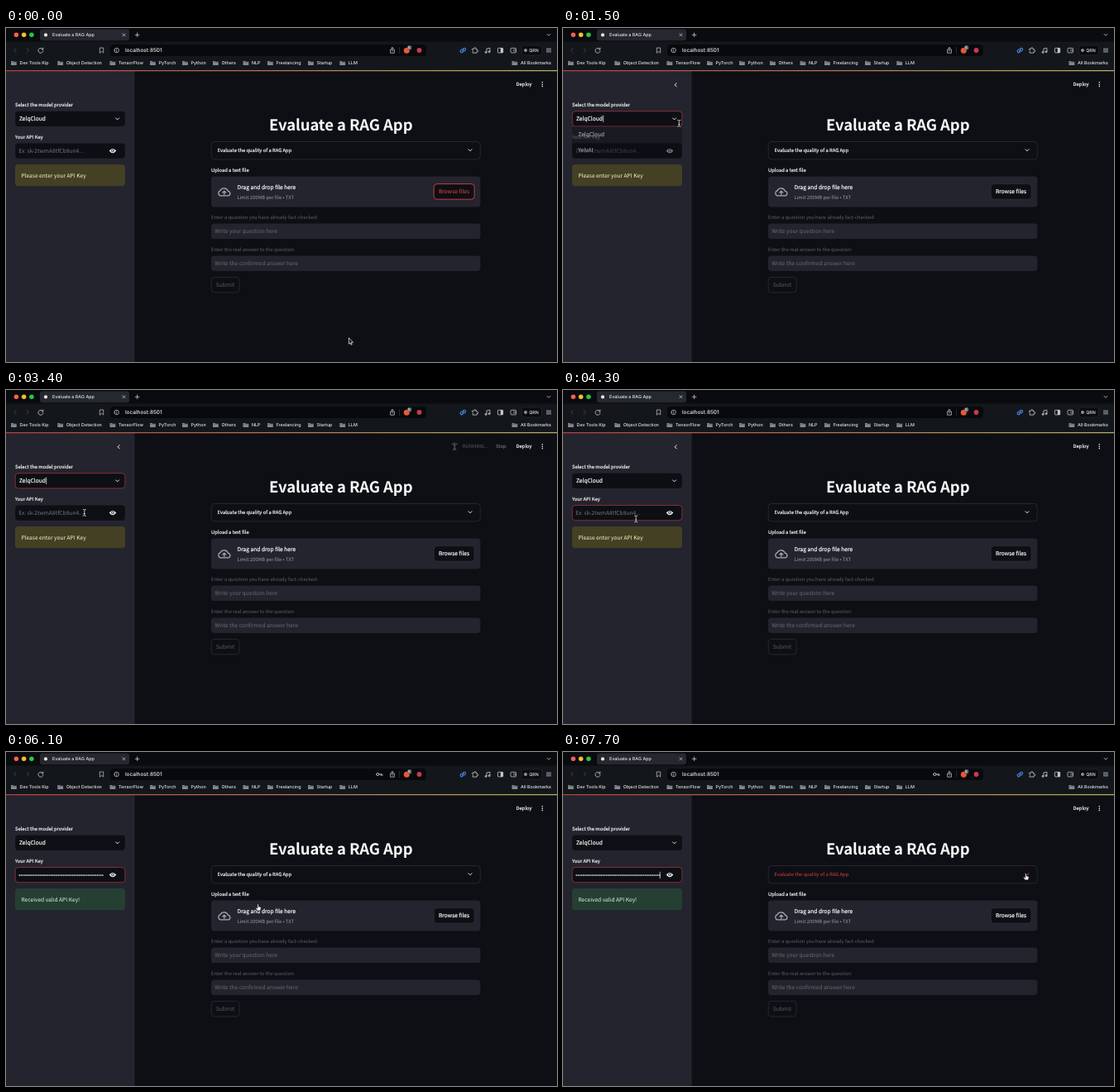
Animation, 666 px wide and 404 px high, one loop 8 s. Source, as an HTML page with a canvas:

```html
<!DOCTYPE html>
<html lang="en">
<head>
<meta charset="utf-8">
<title>Evaluate a RAG App</title>
<style>
  html, body { margin: 0; width: 100%; height: 100%; overflow: hidden; background: #0d0f14; }
  canvas { display: block; width: 666px; height: 404px; }
</style>
</head>
<body>
<canvas id="stage"></canvas>
<script>
const W = 666, H = 404, LOOP = 8000;
const canvas = document.getElementById('stage');
const ctx = canvas.getContext('2d');
const dpr = window.devicePixelRatio || 1;
canvas.width = W * dpr;
canvas.height = H * dpr;

const SANS = '"Noto Sans CJK JP", "Noto Sans CJK SC", "Noto Sans CJK", "Open Sans", sans-serif';
const UI = 'Inter, Roboto, "Liberation Sans", sans-serif';
const BODY = 6.65, SMALL = 5.83;
const BG = '#0d0f14', PANEL = '#23242d', TEXT = '#f6f6f7', RED = '#f0474a', FOCUS = '#b0383d', DIM = '#606269';
const PROVIDER = 'ZelqCloud', OTHER = 'YelvAI';

// ---------- helpers ----------
const clamp = v => Math.max(0, Math.min(1, v));
const ramp = (t, a, b) => clamp((t - a) / (b - a));
const pulse = (t, a, b, c, d) => ramp(t, a, b) * (1 - ramp(t, c, d));
const ease = p => p * p * (3 - 2 * p);
const within = (t, a, b) => t >= a && t < b;

// A hairline outline gives small bright text its slightly heavy look.
function text(str, x, y, size = BODY, color = TEXT, o = {}) {
  ctx.font = `${o.weight || 400} ${size}px ${o.font || SANS}`;
  ctx.textAlign = o.align || 'left';
  ctx.letterSpacing = o.spacing || '0px';
  ctx.textRendering = 'geometricPrecision';
  ctx.fillStyle = ctx.strokeStyle = color;
  ctx.fillText(str, x, y + size * 0.36);
  if (color === TEXT) {
    ctx.lineWidth = 0.2;
    ctx.lineJoin = 'round';
    ctx.strokeText(str, x, y + size * 0.36);
  }
  return ctx.measureText(str).width;
}
const ui = (str, x, y, size = 5.38, color = '#e6e7ea') =>
  text(str, x, y, size, color, { font: UI, weight: 500 });

function box(x, y, w, h, r, fill, stroke, lw = 0.7) {
  ctx.beginPath();
  ctx.roundRect(x, y, w, h, r);
  if (fill) { ctx.fillStyle = fill; ctx.fill(); }
  if (stroke) { ctx.strokeStyle = stroke; ctx.lineWidth = lw; ctx.stroke(); }
}
function dot(x, y, r, color) {
  ctx.beginPath();
  ctx.arc(x, y, r, 0, Math.PI * 2);
  ctx.fillStyle = color;
  ctx.fill();
}
// Path given relative to (x, y).
function icon(d, x, y, color, lw = 0.8, fill) {
  const p = new Path2D(d);
  ctx.save();
  ctx.translate(x, y);
  ctx.lineCap = ctx.lineJoin = 'round';
  if (fill) { ctx.fillStyle = fill; ctx.fill(p); }
  if (lw) { ctx.strokeStyle = color; ctx.lineWidth = lw; ctx.stroke(p); }
  ctx.restore();
}
function faded(alpha, draw) {
  if (alpha <= 0) return;
  ctx.save();
  ctx.globalAlpha = alpha;
  draw();
  ctx.restore();
}
const chevron = (x, y, color = TEXT) => icon('M-2 -1L0 1L2 -1', x, y, color, 0.95);
const caret = (x, y) => { ctx.fillStyle = TEXT; ctx.fillRect(x, y - 4.2, 0.7, 8.4); };

// ---------- browser frame ----------
const BOOKMARKS = [
  [6, 'Dev Tools Kip'], [62.3, 'Object Detection'], [125.5, 'TensorFlow'], [174, 'PyTorch'],
  [213, 'Python'], [250, 'Others'], [286.5, 'NLP'], [316, 'Freelancing'], [365, 'Startup'],
  [403.3, 'LLM'], [611.5, 'All Bookmarks']
];

function folder(x, y) {
  icon('M0 -2.4H2.5L3.3 -1.6H6.8V2.6H0Z', x, y, '', 0, '#85878e');
  ctx.fillStyle = '#55575e';
  ctx.fillRect(x, y - 1, 6.8, 0.5);
}

function browser(t) {
  const C = '#c9cad0', G = '#4c4e56';
  ctx.fillStyle = '#0a0b0f';
  ctx.fillRect(0, 0, W, 17);
  ctx.fillStyle = '#13171b';
  ctx.fillRect(0, 16.5, W, 35.5);

  ['#ff5f57', '#febc2e', '#28c840'].forEach((c, i) => dot(12.4 + i * 9.25, 8.3, 2.75, c));
  box(41, 1.5, 108, 13.7, 3, '#26282f');
  dot(48, 8.4, 2.1, '#e4e4e8');
  ui('Evaluate a RAG App', 56, 8.2);
  icon('M-1.5 -1.5L1.5 1.5M1.5 -1.5L-1.5 1.5', 142.5, 8.3, C);
  icon('M-2.3 0H2.3M0 -2.3V2.3', 158.6, 8.3, C);
  icon('M-2 -1L0 1L2 -1', 656, 8.3, C);

  icon('M1.2 -2.5L-1.3 0L1.2 2.5', 11, 27, G);
  icon('M-1.2 -2.5L1.3 0L-1.2 2.5', 26.3, 27, G);
  icon('M2.5 -1.4A3 3 0 1 0 3 .6M2.9 -3V-1.1H1', 42, 27, C);
  icon('M-2 -3H2V3L0 1.4L-2 3Z', 115.7, 27, C, 0.7);

  box(126, 20, 382, 14, 4, '#08090c');
  icon('M-2.8 0A2.8 2.8 0 1 0 2.8 0A2.8 2.8 0 1 0 -2.8 0M0 -.1V1.4M0 -1.4V-1.3', 133.6, 27, C, 0.75);
  ui('localhost:8501', 144, 26.8, 6.45, '#eeeef1');
  if (t >= 4600) {
    icon('M-3.6 0A1.6 1.6 0 1 0 -.4 0A1.6 1.6 0 1 0 -3.6 0M-.4 0H3.6V1.4M2 0V1.3', 451.3, 27, C, 0.9);
  }
  icon('M-1 -1H-2.4V3.2H2.4V-1H1M0 1V-3.4M-1.4 -2.1L0 -3.5L1.4 -2.1', 467, 27, C, 0.75);
  ctx.fillStyle = '#3a3c44';
  ctx.fillRect(475, 23, 0.6, 8);
  dot(484.3, 27.2, 3.5, '#ee5630');
  box(485.3, 21.2, 4.8, 5, 1.2, '#686b78');
  ui('5', 486.1, 23.8, 4, '#fff');
  dot(499.5, 27, 2.9, '#c93a52');

  icon('M-.6 .9L1 -.8M-.4 -1.2L1 -2.6A1.6 1.6 0 0 1 3.1 -.4L1.6 1M.5 1.4L-.8 2.6A1.6 1.6 0 0 1 -3 .5L-1.6 -.9', 552.3, 27, '#4a86ee', 1.1);
  icon('M-2.8 -1.8H-.9A1 1 0 1 1 .9 -1.8H2.3V0A1 1 0 1 1 2.3 1.5V3.1H-2.8V1.6A1 1 0 0 0 -2.8 -.2Z', 566.8, 27, C, 0.8);
  icon('M-1.3 2V-2.4L2.7 -3.2V1.2M-3 2A.9 .8 0 1 0 -1.3 2A.9 .8 0 1 0 -3 2M1 1.3A.9 .8 0 1 0 2.7 1.3A.9 .8 0 1 0 1 1.3', 582.2, 27.4, C, 0.8);
  box(594.4, 24.3, 6.3, 5.6, 0.8, null, C, 0.8);
  ctx.fillStyle = C;
  ctx.fillRect(597.8, 24.3, 2.9, 5.6);
  box(610, 24.3, 6.5, 5.6, 1, null, C, 0.75);
  box(613.6, 26, 2.9, 2.1, 0.5, null, C, 0.6);
  box(623.5, 21, 24, 12, 3, '#0b0c10', '#2b2d34', 0.6);
  dot(628, 27, 2, '#8e9097');
  ui('QRN', 632.3, 26.8, 5.3);
  icon('M-2.6 -1.9H2.6M-2.6 0H2.6M-2.6 1.9H2.6', 656, 27, C, 0.75);

  BOOKMARKS.forEach(([x, name]) => { folder(x, 42.3); ui(name, x + 10.5, 42.2); });
}

// ---------- sidebar ----------
function eye(x, y) {
  icon('M-4.3 0Q0 -5.4 4.3 0Q0 5.4 -4.3 0Z', x, y, '', 0, TEXT);
  dot(x, y, 1.75, '#0d0f14');
  dot(x, y, 1, TEXT);
}

function options(alpha) {
  faded(alpha, () => {
    box(11, 119.5, 133, 37.5, 3.5, BG);
    box(11, 119.5, 133, 18.7, 3.5, '#1c1d25');
    text(PROVIDER, 18.3, 128.6);
    text(OTHER, 18.3, 147.2);
  });
}

const control = (y, focused) => box(11.2, y, 132.6, 18.2, 3.7, BG, focused ? FOCUS : null);

function sidebar(t) {
  const selectOn = within(t, 1400, 3700), keyOn = t >= 3700;
  const pasted = t >= 4600, valid = t >= 5400;
  ctx.fillStyle = PANEL;
  ctx.fillRect(0, 52, 155.5, H - 52);

  if (within(t, 900, 6000)) icon('M1 -2.1L-1.1 0L1 2.1', 136.2, 68.8, TEXT, 1);

  text('Select the model provider', 11, 93, SMALL);
  control(100.7, selectOn);
  const w = text(PROVIDER, 16, 109.9);
  if (selectOn && (t < 1900 || within(t, 2400, 2900) || t >= 3400)) caret(16.6 + w, 109.8);
  chevron(134.6, 109.9);

  text('Your API Key', 11, 131.9, SMALL);
  control(139.5, keyOn);
  if (pasted) {
    for (let x = 16.2; x < 117; x += 2.14) dot(x, 149, 0.85, TEXT);
  } else {
    text('Ex: sk-2twmA8tfCb8un4...', 15.2, 148.7, BODY, '#74767c');
  }
  if (pasted ? (t - 4600) % 1000 < 500 : within(t, 3800, 4300)) caret(pasted ? 116.8 : 14.6, 149);
  eye(129, 148.6);

  box(11, 165, 133, 26.2, 3.7, valid ? '#253f33' : '#444024');
  text(valid ? 'Received valid API Key!' : 'Please enter your API Key', 18.4, 178.3, BODY,
    valid ? '#dcfbe6' : '#fcf9c6');

  options(pulse(t, 1400, 1600, 2550, 2800));
}

// ---------- main page ----------
const LEFT = 248, WIDE = 325.4;

function field(label, hint, y) {
  text(label, LEFT, y, SMALL, DIM);
  box(LEFT, y + 7.3, WIDE, 18.5, 3.7, PANEL);
  text(hint, 252.2, y + 16.7, BODY, '#6a6c73');
}

function running(alpha) {
  faded(alpha, () => {
    const c = '#5b5d63';
    dot(542.2, 64.4, 1, c);
    icon('M-3 -3.2L-1 -1.4H1L3 -3.2M0 -1.4V1.4M0 1.4L-1.5 4.6M0 1.4L1.5 4.6', 542.2, 68.1, c, 1.1);
    text('RUNNING...', 551.8, 68.2, SMALL, c);
    text('Stop', 592, 68.2, SMALL, '#8b8d92');
  });
}

function page(t, hover) {
  ctx.fillStyle = BG;
  ctx.fillRect(155.5, 52, W - 155.5, H - 52);

  running(pulse(t, 2900, 3050, 3400, 3600) + pulse(t, 5250, 5400, 5400, 5550));
  text('Deploy', 616.6, 68.1, SMALL);
  [-2.4, 0, 2.4].forEach(d => dot(648.3, 68.2 + d, 0.8, TEXT));

  text('Evaluate a RAG App', 404.7, 117.5, 18.5, '#fafafa', { weight: 700, align: 'center', spacing: '-0.1px' });

  box(LEFT + 0.2, 137.5, WIDE - 0.4, 21.4, 3.7, null, '#303239');
  text('Evaluate the quality of a RAG App', 255.6, 148.2, SMALL, hover ? '#dc4145' : TEXT);
  chevron(561, 147.8, hover ? RED : TEXT);

  text('Upload a text file', LEFT, 172.2, SMALL);
  box(LEFT, 179.6, WIDE, 36.8, 3.7, PANEL);
  icon('M-5 4.6A3.3 3.3 0 0 1 -4.7 -1.6A5 5 0 0 1 4.6 -.9A2.8 2.8 0 0 1 5 4.6ZM0 3V-.8M-2 .8L0 -1.2L2 .8', 263.8, 198.3, '#a9abb2', 1.25);
  text('Drag and drop file here', 279.6, 193);
  text('Limit 200MB per file • TXT', 279.6, 205.1, SMALL, '#9d9fa6');
  const focus = t < 1400;
  box(517.2, 188.6, 48.9, 18.6, 3.7, BG, focus ? '#d84246' : '#34363d', focus ? 0.9 : 0.7);
  text('Browse files', 541.5, 197.9, BODY, focus ? RED : TEXT, { align: 'center' });

  field('Enter a question you have already fact-checked:', 'Write your question here', 229.3);
  field('Enter the real answer to the question:', 'Write the confirmed answer here', 268.2);
  box(248.2, 301.4, 33.9, 18.5, 3.7, null, '#303239');
  text('Submit', 265, 310.6, BODY, '#5a5c62', { align: 'center' });
}

function accentLine() {
  const g = ctx.createLinearGradient(0, 0, W, 0);
  g.addColorStop(0, '#e2474a');
  g.addColorStop(1, '#dcd673');
  ctx.fillStyle = g;
  ctx.fillRect(0, 51.2, W, 1);
}

// ---------- pointer ----------
const PATH = [
  [0, 414.4, 375.2], [300, 219, 204], [500, 219, 204], [1200, 140.3, 115.3], [1700, 140.3, 115.3],
  [2000, 128, 114], [2100, 128, 114], [2500, 62, 128], [2700, 62, 128], [3100, 94.8, 148.4],
  [3400, 94.8, 148.4], [3800, 88.2, 156], [5800, 88.2, 156], [6100, 304.6, 184.2],
  [6200, 318, 189.5], [6300, 318, 189.5], [6600, 413.5, 190.5], [6800, 413.5, 190.5], [7700, 559.4, 147.2]
];

function pointerAt(t) {
  const i = PATH.findIndex(k => k[0] > t);
  if (i < 0) return PATH[PATH.length - 1].slice(1);
  const [t0, x0, y0] = PATH[i - 1], [t1, x1, y1] = PATH[i];
  const p = ease(ramp(t, t0, t1));
  return [x0 + (x1 - x0) * p, y0 + (y1 - y0) * p];
}

const inside = (x, y, l, t, r, b) => x >= l && x <= r && y >= t && y <= b;
const overExpander = (x, y) => inside(x, y, 248, 137.5, 574, 159);

function pointer(t, x, y) {
  if (within(t, 5300, 5900)) return;
  const listOpen = within(t, 1500, 2700);
  const hand = overExpander(x, y) || inside(x, y, 248, 179.6, 574, 216.6) ||
    (listOpen && inside(x, y, 11, 119.5, 144, 157));
  const beam = inside(x, y, 11, 100, 144, 119.5) || inside(x, y, 11, 139, 122, 158);
  if (hand) {
    icon('M-.7 .2Q0 -.6 .7 .2V2.8L3 3.3Q3.8 3.6 3.6 4.6L3 7.6H-.9L-2.8 4.8Q-2.9 3.8 -1.8 4L-.7 4.9Z', x, y, '#16171b', 0.6, '#fff');
  } else if (beam) {
    const d = 'M-1.7 -4Q0 -4 0 -3Q0 -4 1.7 -4M0 -3V3M-1.7 4Q0 4 0 3Q0 4 1.7 4M-.9 1.2H.9';
    icon(d, x, y, '#0a0b0e', 1.6);
    icon(d, x, y, '#dedfe3', 0.8);
  } else {
    icon('M0 0V7L1.6 5.5L2.7 8L3.8 7.5L2.7 5.1H4.8Z', x, y, '#f2f2f4', 0.75, '#08080a');
  }
}

// ---------- loop ----------
function render(now) {
  const t = Math.floor((now % LOOP) / 100) * 100;
  const [x, y] = pointerAt(t);
  ctx.setTransform(dpr, 0, 0, dpr, 0, 0);
  browser(t);
  page(t, overExpander(x, y));
  sidebar(t);
  accentLine();
  pointer(t, x, y);
}

const start = performance.now();
function tick() {
  render(performance.now() - start);
  requestAnimationFrame(tick);
}
tick();
</script>
</body>
</html>
```
